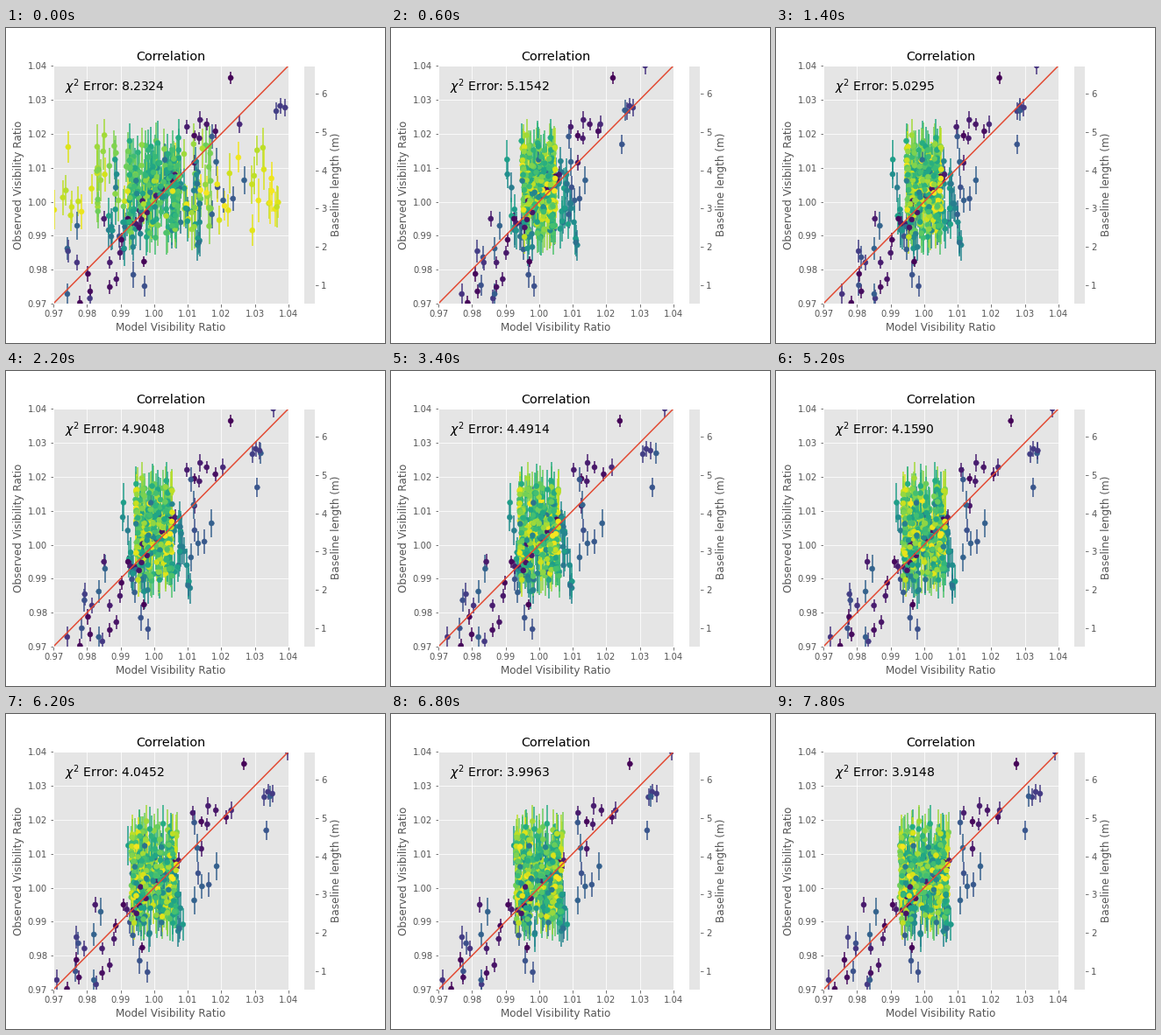
These frames come from a looping animation (432 px wide and 360 px high, 8 s). A matplotlib script:

```python
import numpy as np
import matplotlib.pyplot as plt
from matplotlib.animation import FuncAnimation

plt.style.use("ggplot")
plt.rcParams.update({"font.family": "DejaVu Sans", "font.size": 10})

W, H, STEP, FRAMES = 432, 360, 200, 40
LEFT, RIGHT, TOP, BOTTOM = 54, 321.84, 43.2, 315
CENTER = LEFT + (RIGHT - LEFT) * 3 / 7
SHORTEST, LONGEST = 0.52, 6.73

# The fit improves in jumps and holds its state between them.
JUMPS = STEP * np.array([0, 1, 2, 3, 7, 8, 11, 13, 16, 17, 22, 24, 26, 27,
                         28, 29, 31, 34, 36, 39])
KEY_TIMES = STEP * np.array([0, 3, 11, 17, 26, 31, 39])
CHI = [8.2324, 5.1542, 4.9048, 4.4914, 4.1590, 4.0452, 3.9148]

# Short baselines: length, spread at each key time, final (x, y) in pixels.
PURPLE = (0.8, (.83, .80, .83, .875, .94, .975, 1), [
    (274, 57), (232, 105), (241, 110), (214, 113), (253, 118), (224, 123),
    (231, 126), (224, 154), (100, 218), (133, 218), (124, 242), (122, 257),
    (155, 267), (108, 268), (78, 281), (117, 287), (108, 296), (81, 301),
    (67, 314)])
INDIGO = (1.45, (1.13, .81, .91, .96, .98, 1.02, 1), [
    (318, 43), (296, 89), (301, 91), (292, 95), (255, 110), (82, 255),
    (91, 268), (60, 304), (104, 309)])
BLUE = (2.25, (1.6, .82, 1.02, 1.12, 1.08, 1.11, 1), [
    (288, 94), (210, 124), (284, 133), (213, 153), (233, 174), (214, 182),
    (225, 195), (218, 197), (210, 213), (114, 226), (144, 238), (107, 252),
    (147, 253), (91, 262), (154, 282), (88, 294), (162, 295), (107, 304)])

# Long baselines: count, length range, usual y, tilt,
# half width at the start, after the first fit and at the end.
DENSE = [
    (62, (2.8, 4.1), 205, .15, (52, 35, 23)),
    (150, (4.1, 5.3), 180, .06, (28, 17, 25)),
    (62, (5.3, 6.0), 176, 0, (65, 18, 28)),
    (55, (6.0, 6.7), 180, 0, (142, 19, 27)),
]


def build_points():
    """Return x at each key time, y, baseline length and error per point."""
    rng = np.random.default_rng(12)
    dx = rng.uniform(-32, 32, 12)
    near_line = np.column_stack([CENTER + dx, 195 - dx + rng.normal(0, 7, 12)])
    groups = []
    for length, spread, points in (PURPLE, INDIGO, BLUE):
        if length < 1:
            points = np.vstack([points, near_line])
        x, y = np.array(points, float).T
        lengths = length + rng.uniform(-.25, .25, len(y))
        groups.append((CENTER + np.outer(spread, x - CENTER), y, lengths))
    keys = np.arange(len(KEY_TIMES))[:, None]
    for count, limits, middle, tilt, (start, first, last) in DENSE:
        y = rng.triangular(middle - 62, middle, middle + 70, count)
        phase = rng.uniform(0, 2 * np.pi, count)
        drift = rng.normal(0, .15, count)
        widths = np.append(start, np.linspace(first, last, len(keys) - 1))
        swing = widths[:, None] * np.sin(phase + drift * keys)
        x = CENTER + swing + tilt * (y - 190) * (keys > 0)
        groups.append((x, y, rng.uniform(*limits, count)))
    x, y, length = (np.hstack(part) for part in zip(*groups))
    order = rng.permutation(len(y))
    error = np.minimum(5 + 4 * length, 22) * rng.uniform(.75, 1.15, len(y))
    return x[:, order], y[order], length[order], error[order]


def to_ratio(pixels, low, high):
    return 0.97 + 0.07 * (pixels - low) / (high - low)


def box(left, right):
    return [left / W, 1 - BOTTOM / H, (right - left) / W, (BOTTOM - TOP) / H]


x_px, y_px, length, error_px = build_points()
x_keys = to_ratio(x_px, LEFT, RIGHT)
y = to_ratio(y_px, BOTTOM, TOP)
error = error_px * 0.07 / (BOTTOM - TOP)
colors = plt.cm.viridis((length - SHORTEST) / (LONGEST - SHORTEST))

fig = plt.figure(figsize=(W / 72, H / 72), dpi=72, facecolor="white")
ax = fig.add_axes(box(LEFT, RIGHT))
ax.set(title="Correlation", xlabel="Model Visibility Ratio",
       ylabel="Observed Visibility Ratio")
ticks = np.linspace(0.97, 1.04, 8)
names = [f"{t:.2f}" for t in ticks]
ax.set_xticks(ticks, names)
ax.set_yticks(ticks, names)

bar = fig.add_axes(box(338.6, 352.2))
bar.set(xticks=[], ylim=(SHORTEST, LONGEST), yticks=range(1, 7))
bar.grid(False)
bar.yaxis.tick_right()
bar.yaxis.set_label_position("right")
bar.set_ylabel("Baseline length (m)")

bars = ax.vlines(x_keys[0], y - error, y + error, colors=colors, lw=1.5, zorder=1)
dots = ax.scatter(x_keys[0], y, s=36, c=colors, linewidths=0.5, zorder=1.5)
ax.plot([0.97, 1.04], [0.97, 1.04], color="#E24A33", lw=1.5, zorder=2)
label = ax.text(0.05, 0.895, "", transform=ax.transAxes, fontsize=14, zorder=3)
ax.set(xlim=(0.97, 1.04), ylim=(0.97, 1.04))


def update(frame):
    now = JUMPS[JUMPS <= frame * STEP][-1]
    progress = np.interp(now, KEY_TIMES, np.arange(len(KEY_TIMES)))
    key = min(int(progress), len(KEY_TIMES) - 2)
    x = x_keys[key] + (progress - key) * (x_keys[key + 1] - x_keys[key])
    dots.set_offsets(np.column_stack([x, y]))
    bars.set_segments([[(a, b - e), (a, b + e)] for a, b, e in zip(x, y, error)])
    label.set_text(rf"$\chi^2$ Error: {np.interp(now, KEY_TIMES, CHI):.4f}")
    return bars, dots, label


animation = FuncAnimation(fig, update, frames=FRAMES, interval=STEP,
                          repeat=True, repeat_delay=0)
plt.show()
```
